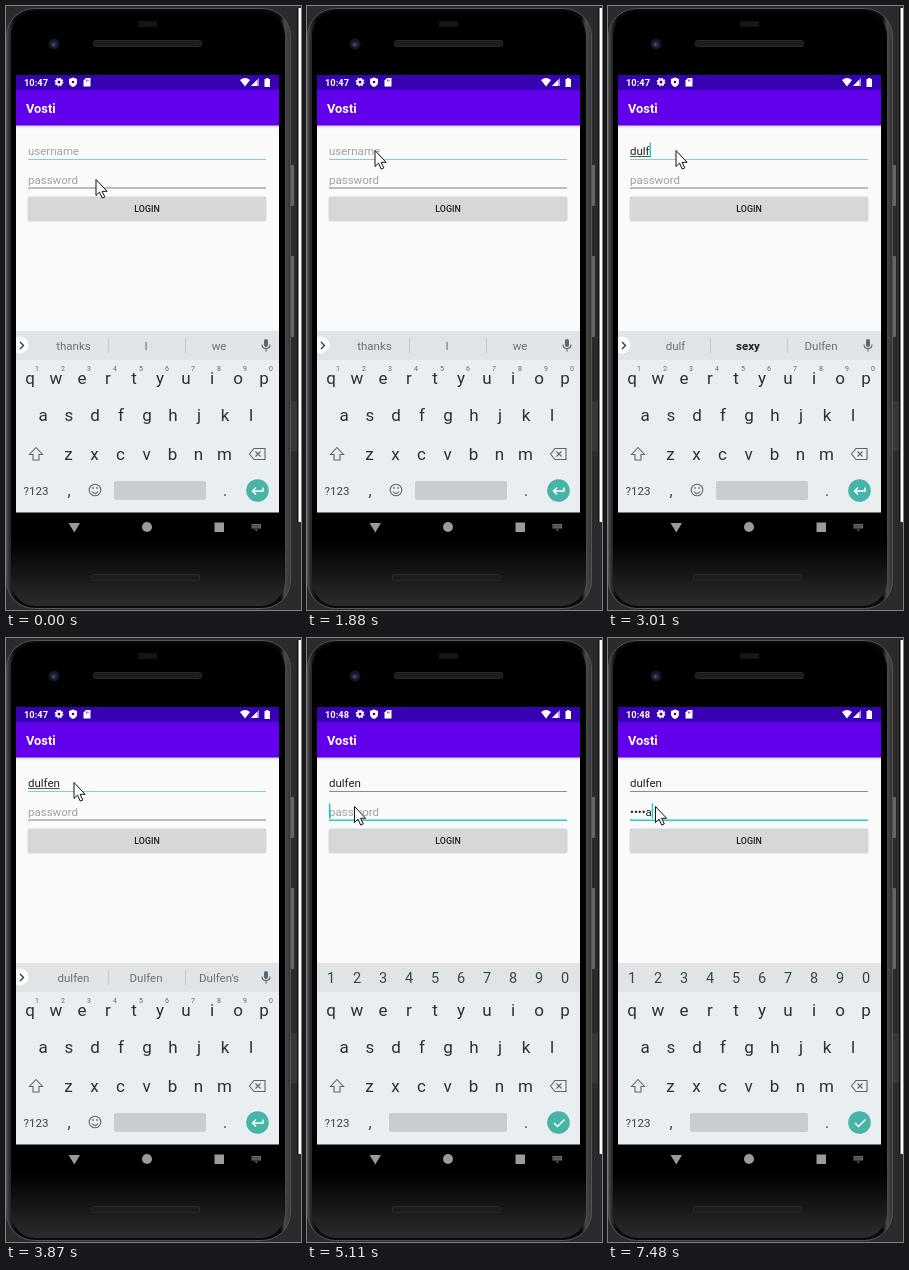
Animation, 295 px wide and 604 px high, one loop 8 s. Source, as an HTML page:

```html
<!DOCTYPE html>
<html lang="en">
<head>
<meta charset="utf-8">
<title>Login screen</title>
<style>
  html, body { margin: 0; width: 100%; height: 100%; overflow: hidden; background: #2b2b2b; }
  svg { display: block; font-family: Roboto, sans-serif; }
  text { white-space: pre; }
  .mid text, text.mid { text-anchor: middle; }
  .line { fill: none; stroke: #5f6568; stroke-width: 1.1; }
</style>
</head>
<body>
<svg width="295" height="604" viewBox="0 0 295 604">
  <defs>
    <linearGradient id="rim">
      <stop offset="0" stop-color="#4a4a4a"/><stop offset=".012" stop-color="#2a2a2a"/>
      <stop offset=".03" stop-color="#0a0a0a"/><stop offset=".965" stop-color="#0a0a0a"/>
      <stop offset=".98" stop-color="#4a4a4a"/><stop offset="1" stop-color="#333"/>
    </linearGradient>
    <linearGradient id="sheen" x2="0" y2="1">
      <stop stop-color="#000"/><stop offset=".89" stop-color="#000"/><stop offset="1" stop-color="#2c2c2c"/>
    </linearGradient>
    <linearGradient id="shade" x2="0" y2="1">
      <stop stop-color="#d4d2da"/><stop offset="1" stop-color="#fafafa"/>
    </linearGradient>
    <clipPath id="screen"><rect x="10" y="69" width="263" height="437.500"/></clipPath>
  </defs>

  <!-- surroundings and phone body -->
  <rect width="295" height="604" fill="#2b2b2b"/>
  <rect x="285" y="395" width="8" height="50" fill="#35383a"/>
  <rect x="291" y="2" width="2" height="514" fill="#111"/>
  <rect x="292.500" y="2" width="2.500" height="514" fill="#fff"/>
  <rect x="284" y="159" width="4" height="41" rx="1" fill="#666"/>
  <rect x="284" y="250" width="4" height="81" rx="1" fill="#666"/>
  <rect x=".5" y="2.500" width="284" height="600" rx="28" fill="url(#rim)" stroke="#555"/>
  <rect x="5" y="5" width="274" height="595" rx="25" fill="url(#sheen)"/>
  <rect x="132" y="15" width="19" height="6" rx="1.500" fill="#151515"/>
  <circle cx="48" cy="38" r="5.500" fill="#15181d"/>
  <circle cx="48" cy="38.500" r="3" fill="#1f2b48"/>
  <circle cx="47.500" cy="38.500" r="1.200" fill="#405a90"/>
  <g fill="#1c1c1c" stroke="#2a2a2a">
    <rect x="87.500" y="34.500" width="108" height="6" rx="2"/>
    <rect x="85.500" y="568.500" width="108" height="6" rx="2"/>
  </g>

  <!-- bars -->
  <rect x="10" y="69" width="263" height="437" fill="#fafafa"/>
  <rect x="10" y="69" width="263" height="15" fill="#3700b3"/>
  <rect x="10" y="119" width="263" height="4" fill="url(#shade)"/>
  <rect x="10" y="84" width="263" height="35.500" fill="#6200ee"/>
  <g fill="#fff">
    <text id="clock" x="18" y="80" font-size="9.300" font-weight="700"></text>
    <circle cx="53" cy="76" r="2.500" fill="none" stroke="#fff" stroke-width="2"/>
    <circle cx="53" cy="76" r="3.800" fill="none" stroke="#fff" stroke-width="1.200" stroke-dasharray="1.500 1.480"/>
    <path d="M67 71.500l4 1.500v3q0 3.500-4 5q-4-1.500-4-5v-3z"/>
    <circle cx="67" cy="76" r="1.300" fill="#3700b3"/>
    <path d="M80 72h4.500v8.500h-7v-6z"/>
    <path d="M80.500 73.500v2m1.500-2v2" stroke="#3700b3" stroke-width=".7"/>
    <path d="M234 74q5-4 10 0l-5 6.500z"/>
    <path d="M253 72v8h-8z" opacity=".6"/><path d="M251 74v6h-6z"/>
    <path d="M258.500 73h1.500v-1h2.500v1h1.500v8h-5.500z"/>
    <text x="20" y="107" font-size="12.800" font-weight="700">Vosti</text>
  </g>

  <!-- form -->
  <g font-size="11.500" fill="#222">
    <text id="user" x="22" y="149"></text>
    <text id="pass" x="22" y="177.500"></text>
  </g>
  <rect id="compose" x="22" y="150" height="1" fill="#555"/>
  <rect id="userLine" x="22" width="238"/>
  <rect id="passLine" x="22" width="238"/>
  <rect id="caret" width="1.300" height="15" fill="#03cdbb"/>
  <rect x="21.500" y="190.500" width="239" height="25" rx="2.500" fill="#d6d7d7"/>
  <text class="mid" x="141" y="206.200" font-size="8.900" font-weight="500" fill="#222">LOGIN</text>

  <!-- keyboard -->
  <g clip-path="url(#screen)">
    <rect x="10" y="325" width="263" height="183" fill="#e9eef1"/>
    <rect x="10" y="325" width="263" height="29" fill="#e0e4e7"/>
    <g id="keys" class="mid" font-size="17" fill="#2b3033"></g>
    <path class="line" d="M30 441.500l-6.500 7h3.500v5.500h6v-5.500h3.500z"/>
    <path class="line" d="M243.500 448l4.500-5.500h11v11h-11zM249.500 445.500l5 5m0-5l-5 5"/>
    <g class="mid" fill="#3c4245">
      <text x="30" y="488.500" font-size="11.500">?123</text>
      <text x="63" y="490" font-size="16">,</text>
      <text x="219" y="490" font-size="16">.</text>
    </g>
    <rect id="space" y="475" height="19" rx="2" fill="#c8cdd0"/>
    <circle cx="251.500" cy="484.500" r="11.300" fill="#48b3a7"/>
    <path id="action" fill="none" stroke="#fff" stroke-width="1.500"/>

    <g id="wordMode">
      <circle cx="14" cy="339" r="8.500" fill="#fff"/>
      <path d="M14 336l3.500 3.500l-3.500 3.500" fill="none" stroke="#333" stroke-width="1.300"/>
      <path d="M102.500 332v15M179.500 332v15" stroke="#c5cacd"/>
      <g id="words" class="mid" font-size="11.500">
        <text x="67.500" y="344"></text><text x="140" y="344"></text><text x="213" y="344"></text>
      </g>
      <rect x="258" y="333" width="4" height="8" rx="2" fill="#5f6568"/>
      <path class="line" d="M256 338.500q0 4 4 4t4-4M260 342.500v3"/>
      <g id="hints" class="mid" font-size="7" fill="#60676a"></g>
      <circle class="line" cx="89" cy="484" r="5.800"/>
      <path class="line" d="M86 485.500q3 4 6 0"/>
      <path d="M86.200 482h1.600m2.400 0h1.600" stroke="#5f6568" stroke-width="1.600"/>
    </g>
    <g id="digits" class="mid" font-size="14.500" fill="#3c4245"></g>
  </g>

  <!-- navigation -->
  <g fill="#9b9b9b">
    <path d="M62.500 517h11.500l-5.700 9.500z"/>
    <circle cx="141" cy="521" r="5"/>
    <rect x="208.500" y="516.500" width="9.500" height="9.500"/>
    <g fill="#707070">
      <path d="M245.500 518h9.500v4.500h-9.500zM248.500 523.500h3.500l-1.700 1.800z"/>
      <path d="M246.500 519.500h8M246.500 521h8" stroke="#000" stroke-width=".8" stroke-dasharray="1 1"/>
    </g>
  </g>

  <path id="mouse" d="M0 .5v16l3.500-3.400l2.700 6l2.600-1.200l-2.700-5.600h5z" fill="#fff" stroke="#111"/>
</svg>
<script>
const LOOP = 8000;
const $ = id => document.getElementById(id);

// Each entry is [start time, value]; a value holds until the next entry.
const typed = [[0, ''], [2000, 'd'], [2240, 'du'], [2610, 'dul'], [3010, 'dulf'], [3280, 'dulfen']];
const secret = [[0, ''], [6210, 'p'], [6330, '•a'], [6860, '••s'], [7230, '•••s'], [7480, '••••a']];
const caretOn = [[0, 0], [390, 1], [920, 0], [1320, 1], [1880, 0], [2000, 1], [3870, 0],
  [4300, 1], [4840, 0], [4990, 1], [5650, 0], [6210, 1]];
const pointer = [[0, [90, 173]], [120, [83, 164]], [270, [74, 152]], [390, [68, 144]],
  [4130, [62, 150]], [4300, [56, 157]], [4440, [50, 164]], [4570, [47.5, 168]]];
// A leading * marks the bold suggestion.
const suggestions = [[0, 'thanks I we'], [2120, 'd *do did'], [2240, 'du *due dug'], [2610, 'dul *dull full'],
  [3010, 'dulf *sexy Dulfen'], [3280, "dulfen Dulfen Dulfen's"]];

const at = (track, t) => track.findLast(([start]) => start <= t)[1];

function set(id, attrs) {
  for (const name in attrs) $(id).setAttribute(name, attrs[name]);
}

const row = (chars, x, y) =>
  [...chars].map((c, i) => `<text x="${x + i * 26}" y="${y}">${c}</text>`).join('');

$('keys').innerHTML = row('qwertyuiop', 24, 377.5) + row('asdfghjkl', 37, 415) + row('zxcvbnm', 62.5, 453.5);
$('hints').innerHTML = row('1234567890', 31, 364.5);
$('digits').innerHTML = row('1234567890', 24, 345);

function showField(id, value, hint, hintColor) {
  $(id).textContent = value || hint;
  set(id, { fill: value ? '#222' : hintColor });
  return value ? $(id).getComputedTextLength() : 0;
}

function render(t) {
  const onPassword = t >= 4990;
  const numeric = t >= 5110;
  const pressed = t >= 920 && t < 1070;

  $('clock').textContent = t < 4720 ? '10:47' : '10:48';
  const userWidth = showField('user', at(typed, t), 'username', pressed ? '#707070' : '#a0a0a0');
  const passWidth = showField('pass', at(secret, t), 'password', '#a0a0a0');
  set('userLine', { y: 153, height: 1, fill: onPassword ? '#8c8c8c' : '#7fd3c4' });
  set('passLine', { y: 181.5, height: onPassword ? 1.5 : 1, fill: onPassword ? '#2ccdbf' : '#808080' });
  set('compose', { width: onPassword ? 0 : userWidth });
  set('caret', {
    x: 22 + (onPassword ? passWidth : userWidth),
    y: onPassword ? 165.5 : 136.5,
    opacity: at(caretOn, t)
  });

  set('wordMode', { display: numeric ? 'none' : 'inline' });
  set('digits', { display: numeric ? 'inline' : 'none' });
  set('space', numeric ? { x: 82, width: 118 } : { x: 108, width: 92 });
  set('action', { d: numeric ? 'M247 485l3.500 3.500l7-7' : 'M257 481.500v3.500h-10.500m3.500-3.500l-3.500 3.500l3.500 3.500' });
  at(suggestions, t).split(' ').forEach((word, i) => {
    const bold = word[0] === '*';
    const label = $('words').children[i];
    label.textContent = bold ? word.slice(1) : word;
    label.setAttribute('font-weight', bold ? 700 : 400);
    label.setAttribute('fill', bold ? '#1c1f21' : '#6a7073');
  });

  set('mouse', { transform: `translate(${at(pointer, t)})` });
}

const start = performance.now();
function tick() {
  render((performance.now() - start) % LOOP);
  requestAnimationFrame(tick);
}
tick();
</script>
</body>
</html>
```
